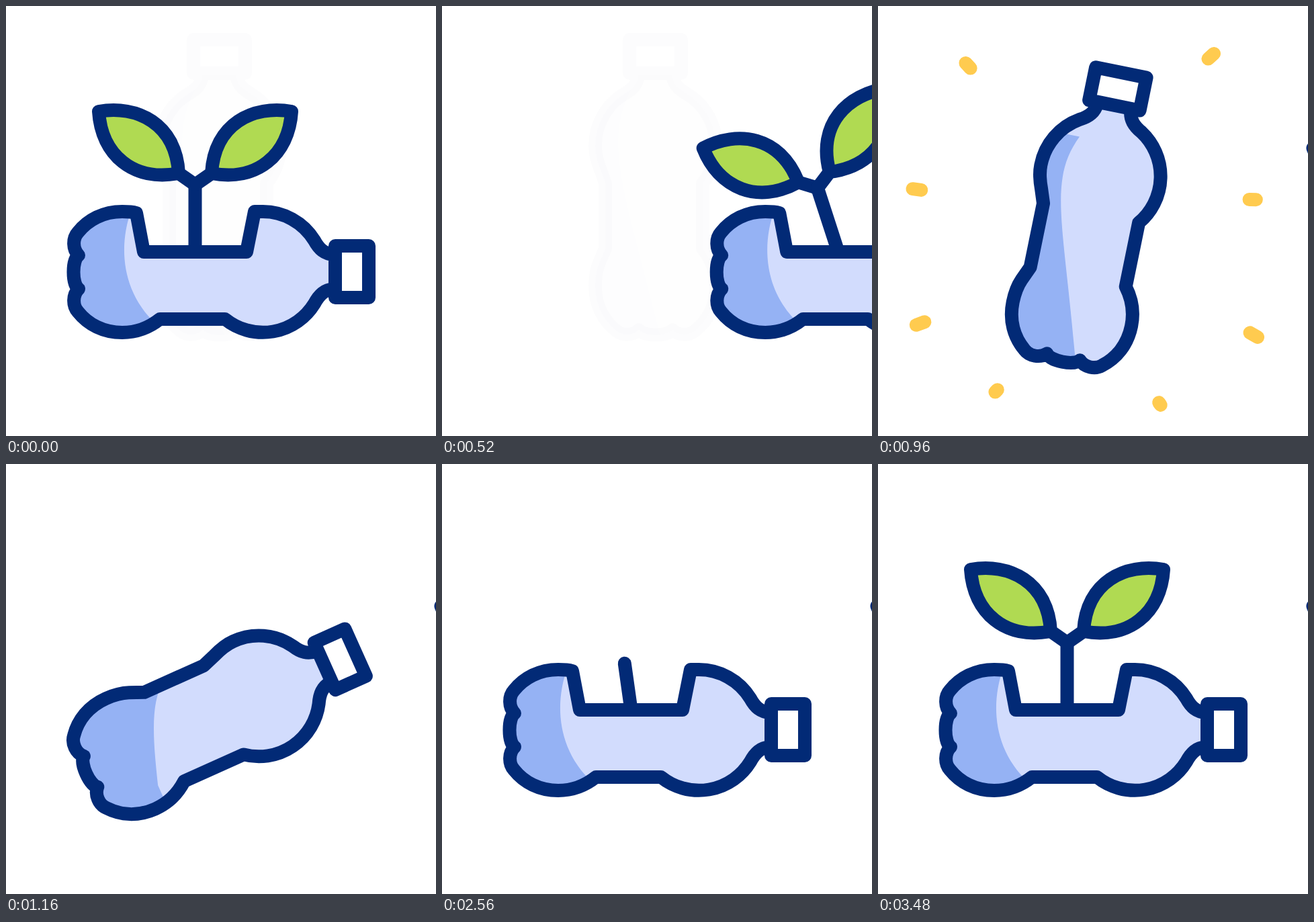
An HTML page that plays this animation: 640 px wide and 640 px high, repeating every 3600 ms.

```html
<!DOCTYPE html>
<html lang="en">
<head>
<meta charset="utf-8">
<title>Bottle planter</title>
<style>
  html, body { margin: 0; width: 100%; height: 100%; overflow: hidden; background: #fff; }
  svg { display: block; width: 100%; height: 100%; }
  .line { fill: none; stroke: #022a76; stroke-width: 20; stroke-linecap: round; stroke-linejoin: round; }
  .leaf { fill: #b0da52; vector-effect: non-scaling-stroke; }
  .spark { stroke: #ffcb4f; }
</style>
</head>
<body>
<svg id="stage" viewBox="0 0 640 640"></svg>
<script>
const LOOP = 3600;
const NS = 'http://www.w3.org/2000/svg';
const stage = document.getElementById('stage');

const clamp = v => Math.min(1, Math.max(0, v));
const span = (t, from, to) => clamp((t - from) / (to - from));
const sine = p => (1 - Math.cos(Math.PI * p)) / 2;
const mix = (a, b, p) => a + (b - a) * p;
// Blend two flat lists of x,y pairs into path text.
const blend = (a, b, p) => a.map((v, i) => mix(v, b[i], p).toFixed(2)).join(' ');

function set(el, attrs) {
  for (const key in attrs) el.setAttribute(key, attrs[key]);
  return el;
}
function add(parent, tag, attrs = {}) {
  return set(parent.appendChild(document.createElementNS(NS, tag)), attrs);
}

// Bottle lying on its side; cut 0 is whole, cut 1 has the planter opening.
const CAP = 'M490 357H540V434H490Z';
function bodyPath(cut) {
  const top = (a, b) => blend(a, b, cut);
  return 'M488 370C474 369 466 362 459 349A90 90 0 0 0 381 306' +
    'C' + top([368, 306, 356, 310, 346, 314], [378, 306, 374, 306, 370, 306]) +
    'L' + top([326, 321, 229, 321, 208, 312], [358, 366, 205, 366, 194, 308]) +
    'C' + top([196, 307, 185, 306, 173, 306], [187, 306, 180, 306, 173, 306]) +
    'C145 306 122 318 107 337C99 346 99 362 108 371C98 378 98 414 108 421' +
    'C99 430 99 446 107 455C122 474 145 486 173 486C195 486 214 478 229 466' +
    'H326A90 90 0 0 0 459 443C466 430 474 422 488 421';
}

// Shaded side: along the bottle when upright, across its base when lying.
function shadePath(lie) {
  const part = (a, b) => blend(a, b, lie);
  return 'M' + part([470, 362], [188, 300]) +
    'C' + part([390, 318, 330, 345, 98, 403], [170, 345, 165, 420, 225, 475]) +
    'L' + part([98, 403, 60, 403, 60, 280, 470, 280], [225, 520, 60, 520, 60, 280, 188, 280]) + 'Z';
}

function makeBottle(parent, id) {
  const clip = add(add(parent, 'clipPath', { id }), 'path');
  const paint = add(parent, 'g');
  const fill = add(paint, 'path', { fill: '#d2dcfd' });
  const shade = add(paint, 'path', { fill: '#95b2f4', 'clip-path': `url(#${id})` });
  const line = add(parent, 'path', { class: 'line' });
  return (cut, lie, opacity) => {
    const body = bodyPath(cut);
    set(clip, { d: body });
    set(fill, { d: body + 'Z' });
    set(shade, { d: shadePath(lie) });
    set(line, { d: body + CAP, opacity });
    set(paint, { opacity });
  };
}

const LEAF = 'M0 1L-24.5-16C-28.5-90-86.5-118-143.5-108C-139.5-43-91.5-3-24.5-16';

function makePlant(parent) {
  const plant = add(parent, 'g');
  const stem = add(plant, 'path', { class: 'line' });
  const leaves = add(plant, 'g');
  for (const side of [1, -1])
    add(leaves, 'path', { class: 'line leaf', d: LEAF, transform: `scale(${side} 1)` });
  return (tilt, height, size) => {
    set(plant, { transform: `rotate(${tilt} 281.5 366)`, display: height > 0 ? 'inline' : 'none' });
    set(stem, { d: `M281.5 366V${366 - 101 * height}` });
    set(leaves, { transform: `translate(281.5 265) scale(${size})`, display: size > 0 ? 'inline' : 'none' });
  };
}

function makeScene(id) {
  const root = add(stage, 'g');
  const plant = makePlant(root);
  const bottle = makeBottle(root, id);
  return { root, plant, bottle };
}

const arriving = makeScene('bodyIn');
const leaving = makeScene('bodyOut');

// Inner and outer ends of each ray: x1, y1, x2, y2.
const sparks = [
  [213, 174, 188, 147], [401, 160, 431, 133],
  [200, 292, 155, 286], [444, 286.5, 480, 287],
  [202, 422, 158, 438], [433, 417, 473, 440],
  [214, 535, 202, 547], [391, 551, 400, 564]
].map(ends => ({ ends, el: add(stage, 'line', { class: 'line spark' }) }));

function drawSparks(t) {
  const head = span(t, 660, 760) + 2.3 * span(t, 760, 960);
  const tail = 3.3 * span(t, 760, 980);
  const display = t > 660 && t < 980 ? 'inline' : 'none';
  for (const { ends: [x1, y1, x2, y2], el } of sparks)
    set(el, {
      display,
      x1: mix(x1, x2, tail), y1: mix(y1, y2, tail),
      x2: mix(x1, x2, head), y2: mix(y1, y2, head)
    });
}

function drawLeaving(t) {
  const lean = sine(span(t, 0, 250));
  const x = -13 * lean + 580 * span(t, 250, 580) ** 3;
  set(leaving.root, { transform: `translate(${x} 0)` });
  leaving.plant(-18 * lean, 1, 1);
  leaving.bottle(1, 1, 1);
}

function drawArriving(t) {
  const lie = sine(span(t, 850, 1326));
  const up = 1 - lie;
  const y = (-125.5 + 32.5 * span(t, 560, 850)) * up;
  set(arriving.root, { transform: `translate(${-2.5 * up} ${y}) rotate(${-90 * up} 320 395.5)` });
  arriving.bottle(sine(span(t, 1650, 2190)), lie, mix(0.012, 1, span(t, 560, 880) ** 2));

  const grow = sine(span(t, 2220, 2765));
  arriving.plant(-26 * (1 - grow), grow, span(t, 2790, 3480));
}

const start = performance.now();
function frame() {
  const t = (performance.now() - start) % LOOP;
  drawArriving(t);
  drawLeaving(t);
  drawSparks(t);
  requestAnimationFrame(frame);
}
frame();
</script>
</body>
</html>
```
